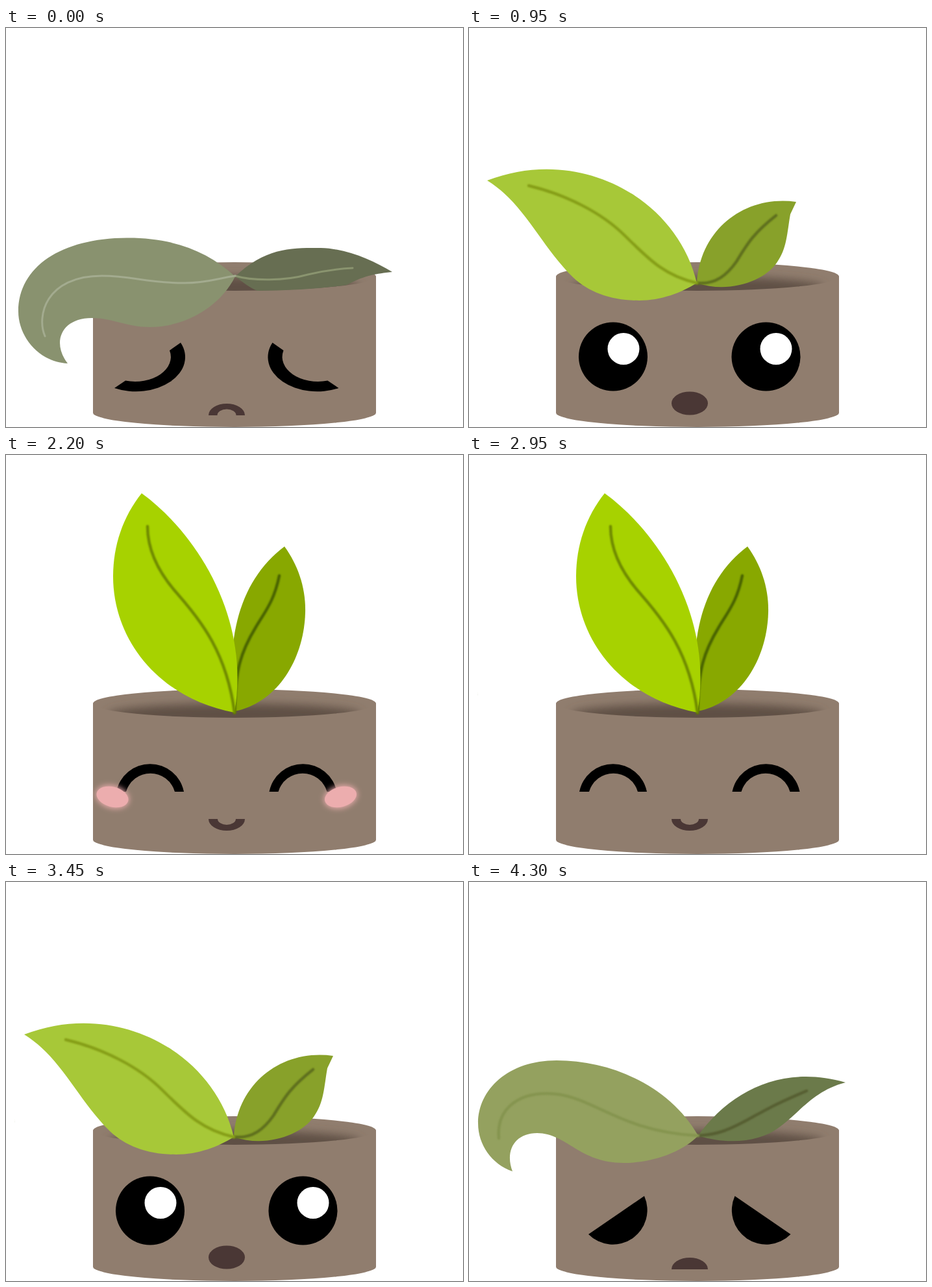
These frames come from a looping animation (704x615 px, 4.4 s). An HTML page:

```html
<!DOCTYPE html>
<html lang="en">
<head>
<meta charset="utf-8">
<title>Potted seedling</title>
<style>
  html, body { margin: 0; width: 100%; height: 100%; overflow: hidden; background: #fff; }
  svg { display: block; width: 100%; height: 100%; }
</style>
</head>
<body>
<svg viewBox="0 0 704 615">
  <defs>
    <clipPath id="rim"><ellipse cx="352" cy="383" rx="218" ry="22"/></clipPath>
    <filter id="soft" x="-20%" y="-20%" width="140%" height="140%"><feGaussianBlur stdDeviation="1"/></filter>
    <filter id="shade" x="-20%" y="-100%" width="140%" height="300%"><feGaussianBlur stdDeviation="7"/></filter>
    <filter id="glow" x="-50%" y="-50%" width="200%" height="200%"><feGaussianBlur stdDeviation="4"/></filter>
  </defs>
  <path fill="#907d6e" d="M134 383A218 22 0 0 1 570 383V593A218 22 0 0 1 134 593Z"/>
  <g clip-path="url(#rim)">
    <ellipse id="soil" cx="352" cy="400" rx="195" ry="17" filter="url(#shade)"/>
  </g>
  <g id="plant"></g>
  <g id="blush" fill="#ecadae">
    <g transform="translate(164 527) rotate(15)">
      <ellipse rx="26" ry="17" filter="url(#glow)"/><ellipse rx="25" ry="15.5"/>
    </g>
    <g transform="translate(515.5 527) rotate(-15)">
      <ellipse rx="26" ry="17" filter="url(#glow)"/><ellipse rx="25" ry="15.5"/>
    </g>
  </g>
</svg>
<script>
// Leaves are [fill, outline, vein colour, vein path]; shine is [x, y, rx, ry, tilt].
const poses = {
  droop: {
    right: ['#676e52', 'M353 383C400 338 440 339 485 339C525 340 565 358 595 376C570 379 555 380 525 396Q460 405 387 405C375 400 365 392 353 383Z',
      '#8a946f', 'M353 382C380 390 430 390 465 380C490 374 510 371 534 370'],
    left: ['#89926f', 'M353 383C310 343 255 323 186 323.5C85 324 19 368 19 437C19 475 50 515 95 517C70 485 85 447 132 447C165 447 185 461 222 461C275 461 330 430 353 383Z',
      '#a3ab8f', 'M60 475C47 445 60 382 148 382C195 382 215 393 275 393C310 393 330 385 353 382'],
    eye: 'M269 485A76 53 0 0 1 167 555L184 543.5A55 38 0 0 0 252 497Z',
    mouth: 'M312 597A28 18 0 0 1 368 597H354.5A14.5 9.5 0 0 0 325.5 597Z',
    crisp: true
  },
  sad: {
    right: ['#6b7a4a', 'M353 391C400 325 480 280 580 309C530 322 510 355 478 378C450 400 400 406 353 391Z',
      '#575f32', 'M353 391C385 389 400 382 430 366C465 347 475 341 520 322'],
    left: ['#94a15f', 'M353 391C310 315 220 275 135 275C60 275 14 320 14 372C14 405 35 435 67 446C55 415 70 387 105 387C150 387 170 433 238 433C285 433 330 415 353 391Z',
      '#85944f', 'M46 395C42 350 75 326 120 326C190 326 225 384 353 391'],
    eye: 'M270 484A53 53 0 0 1 184 543Z',
    mouth: 'M312 597A28 18 0 0 1 368 597Z'
  },
  wilt: {
    right: ['#798e3b', 'M352 392C375 320 460 265 545 285C505 310 505 335 476 370C455 396 400 408 352 392Z',
      '#5b6829', 'M352 392C385 393 400 380 420 362C445 335 465 325 497 303'],
    left: ['#9cb44c', 'M352 392C315 285 215 238 120 243C70 246 25 270 0 322C60 315 95 345 140 378C175 410 210 427 250 427C290 427 328 412 352 392Z',
      '#869a34', 'M55 302C110 265 190 300 235 342C265 368 300 386 352 392'],
    eye: 'M258 467.6A53 53 0 1 1 171 522Z',
    shine: [241, 497, 16, 14, 0],
    mouth: 'M314.5 597A28 18 0 1 1 365.5 597Z'
  },
  awake: {
    right: ['#88a12a', 'M351 393C356 310 425 257 504 268L495 287C490 315 490 340 474 362C455 390 400 410 351 393Z',
      '#5f701f', 'M351 393C380 396 398 380 412 360C430 330 440 315 473 289'],
    left: ['#a7c838', 'M351 393C320 262 170 180 28 235C85 270 110 335 160 384C185 408 220 420 262 420C296 420 327 408 351 393Z',
      '#869f18', 'M92 243C150 257 205 285 240 320C275 354 300 382 351 393'],
    eye: 'M169 506.5a53 53 0 1 1 106 0a53 53 0 1 1 -106 0Z',
    shine: [238, 494.5, 24.5, 24.5, 0],
    mouth: 'M312 578.5a28 18 0 1 1 56 0a28 18 0 1 1 -56 0Z'
  },
  perk: {
    right: ['#95ae1a', 'M345 395C330 310 390 235 481 228L475 252C476 270 480 300 475 322C465 365 412 397 360 397Z',
      '#667e10', 'M451 256C430 283 418 300 410 325C400 360 385 383 345 394'],
    left: ['#b0d621', 'M356 391C353 260 235 145 79 163C120 195 132 255 150 300C175 362 225 402 300 402C322 402 340 398 356 391Z',
      '#88a70a', 'M138 187C195 217 237 255 270 300C295 337 310 365 356 391'],
    eye: 'M169 506.5a53 39 0 1 1 106 0a53 39 0 1 1 -106 0Z',
    shine: [242, 491, 20.5, 12, 0],
    mouth: 'M314.5 561A28 18 0 1 0 365.5 561Z'
  },
  lift: {
    right: ['#8fae02', 'M351 394C330 290 378 205 448 167C461 190 468 215 468 246C466 320 420 385 351 394Z',
      '#587500', 'M437 209C425 245 405 263 385 288C362 315 352 350 350 395'],
    left: ['#b1db00', 'M351 394C340 275 255 145 133 99C120 128 115 155 115 186C115 300 210 400 351 394Z',
      '#84a300', 'M154 148C166 200 215 225 250 252C290 285 325 330 351 395'],
    eye: 'M170 519A53 53 0 0 1 274 519Z',
    shine: [242, 491.5, 20, 7, 22],
    mouth: 'M312 561A28 18 0 0 0 368 561Z',
    soil: '#2c2622'
  },
  happy: {
    right: ['#88a800', 'M352 395C336 275 364 190 429 141C450 170 462 205 461 243C459 315 418 382 352 395Z',
      '#4a6400', 'M421 186C413 225 400 240 385 265C362 303 353 330 352 397'],
    left: ['#a7d200', 'M352 397C235 375 165 285 165 187C165 140 180 95 209 59C293 120 377 250 352 397Z',
      '#6f8a00', 'M218 110C218 150 238 185 265 215C300 255 340 305 352 397'],
    eye: 'M170 519A53 53 0 0 1 274 519H260A39 39 0 0 0 185 519Z',
    mouth: 'M312 561A28 18 0 0 0 368 561H354A14 9 0 0 1 326 561Z'
  }
};

const timeline = [
  [0, 'droop'], [750, 'sad'], [850, 'wilt'], [950, 'awake'],
  [1700, 'perk'], [1800, 'lift'], [1900, 'happy'],
  [3250, 'lift'], [3350, 'perk'], [3450, 'awake'], [4200, 'wilt'], [4300, 'sad']
];
const LOOP = 4400;
const $ = id => document.getElementById(id);

function leaf([fill, outline, stroke, vein], crisp) {
  const style = crisp ? 'stroke-width="3"' : 'stroke-width="4.5" filter="url(#soft)"';
  return `<path fill="${fill}" d="${outline}"/>
    <path fill="none" stroke="${stroke}" stroke-linecap="round" ${style} d="${vein}"/>`;
}

function shines([x, y, rx, ry, tilt]) {
  return [x, x + 235].map(cx =>
    `<ellipse fill="#fff" rx="${rx}" ry="${ry}" transform="translate(${cx} ${y}) rotate(${tilt})"/>`).join('');
}

function drawPose(p) {
  return leaf(p.right, p.crisp) + leaf(p.left, p.crisp) +
    `<path d="${p.eye}"/><path d="${p.eye}" transform="translate(679.5 0) scale(-1 1)"/>` +
    (p.shine ? shines(p.shine) : '') +
    `<path fill="#4a3735" d="${p.mouth}"/>`;
}

let current;
function tick(now) {
  const t = now % LOOP;
  const name = timeline.findLast(([start]) => start <= t)[1];
  if (name !== current) {
    current = name;
    $('plant').innerHTML = drawPose(poses[name]);
    $('soil').setAttribute('fill', poses[name].soil || '#5f5045');
  }
  $('blush').style.display = t >= 2200 && t < 2950 ? '' : 'none';
}

const begin = performance.now();
function loop() {
  tick(performance.now() - begin);
  requestAnimationFrame(loop);
}
loop();
</script>
</body>
</html>
```
